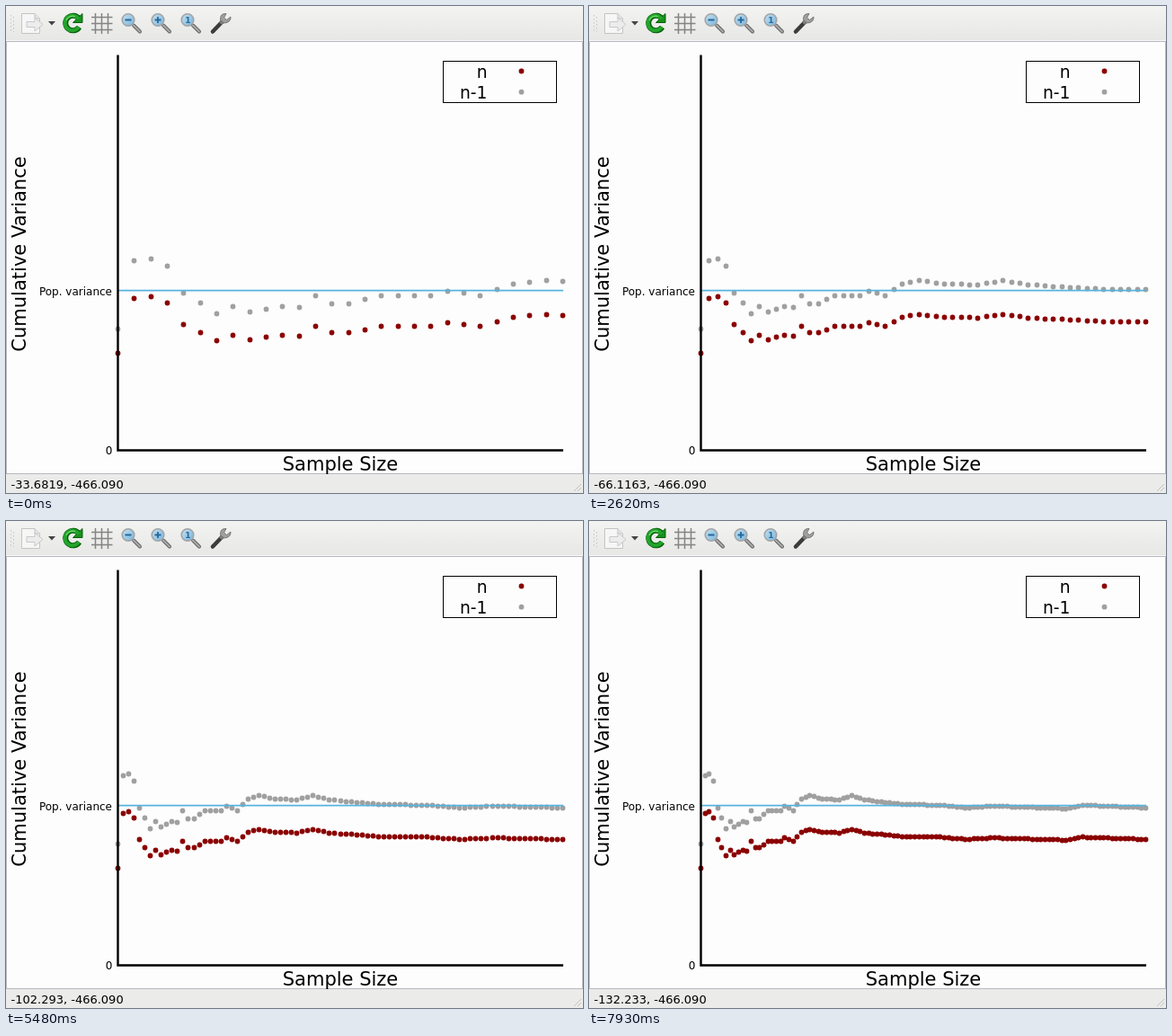
These frames come from a looping animation (642x542 px, 8 s). An HTML page:

```html
<!DOCTYPE html>
<html lang="en">
<head>
<meta charset="utf-8">
<title>Cumulative variance</title>
<style>
  html, body { margin: 0; width: 100%; height: 100%; overflow: hidden; background: #ececec; }
  svg { display: block; width: 100%; height: 100%; }
  text { font-family: "DejaVu Sans", sans-serif; fill: #000; white-space: pre; }
  .dots { fill: none; stroke-width: 5.8; stroke-linecap: round; }
  .n { stroke: #8b0000; }
  .n1 { stroke: #a0a0a0; }
</style>
</head>
<body>
<svg viewBox="0 0 642 542">
  <defs>
    <linearGradient id="bar" x2="0" y2="1">
      <stop offset="0" stop-color="#f3f3f2"/><stop offset="1" stop-color="#e7e7e6"/>
    </linearGradient>
    <linearGradient id="lens" x2="1" y2="1">
      <stop offset="0" stop-color="#c4e2f2"/><stop offset="1" stop-color="#78b4dc"/>
    </linearGradient>
    <g id="zoom">
      <path d="M6 6L13 13" stroke="#666" stroke-width="4" stroke-linecap="round"/>
      <path d="M6 6L13 13" stroke="#aaa" stroke-width="2" stroke-linecap="round"/>
      <circle r="6.8" fill="url(#lens)" stroke="#a4a4a4" stroke-width="1.6"/>
    </g>
  </defs>

  <!-- window -->
  <rect width="642" height="542" fill="#ebebea"/>
  <rect width="642" height="38" fill="url(#bar)"/>
  <path d="M0 38.5H642" stroke="#f8f8f8"/>
  <rect x=".5" y="39.5" width="641" height="481" fill="#fdfdfd" stroke="#b8b8c0"/>
  <path d="M640 532L632 540M640 536L636 540" stroke="#c0c0c0"/>

  <!-- toolbar -->
  <path d="M5.5 10V29M8.5 12V29" stroke="#c4c4c4" stroke-dasharray="1.5 2.5"/>
  <path d="M17.5 8.5H32L37.5 14V30.5H17.5Z" fill="#f6f6f6" stroke="#c4c4c4"/>
  <path d="M32 8.5V14H37.5" fill="#e4e4e4" stroke="#c4c4c4"/>
  <path d="M23 17.5H32V13L41 20.5L32 28V23.5H23Z" fill="#ececec" stroke="#c8c8c8"/>
  <path d="M47 17H55L51 21.5Z" fill="#444"/>
  <g fill="none" stroke-linejoin="round">
    <path d="M81.5 14.5A8.3 8.3 0 1 0 81.5 23.5" stroke="#086008" stroke-width="6"/>
    <path d="M85 8.5V18.5H74.5Z" fill="#18901c" stroke="#086008"/>
    <path d="M81 14.5A8.3 8.3 0 1 0 81 23.3" stroke="#22a42c" stroke-width="4"/>
    <path d="M67 16A8 8 0 0 1 77 11.5" stroke="#78d878" stroke-width="1.2"/>
  </g>
  <path d="M99.5 8V31M106.5 8V31M113.5 8V31M95 12.5H118.5M95 19.5H118.5M95 26.5H118.5" stroke="#848484" stroke-width="1.5"/>
  <use href="#zoom" x="136" y="15.5"/>
  <use href="#zoom" x="169" y="15.5"/>
  <use href="#zoom" x="202" y="15.5"/>
  <path d="M132.5 15.5H139.5M165.5 15.5H172.5M169 12V19" stroke="#286898" stroke-width="1.8"/>
  <text x="199.2" y="19" font-size="9" font-weight="bold" style="fill:#286898">1</text>
  <path d="M230 28.5L241 17" stroke="#3c3c3c" stroke-width="4.5" stroke-linecap="round"/>
  <path d="M238.5 19.5L243 15" stroke="#808080" stroke-width="3.5"/>
  <path d="M245 8.5Q238 8 238.5 15.5L242.5 19Q250.5 18.5 250 12L245.5 15.5L242.5 13Z" fill="#a0a0a0" stroke="#666" stroke-width=".8"/>

  <!-- plot -->
  <text x="118" y="322" font-size="12" text-anchor="end">Pop. variance</text>
  <text x="118.5" y="499" font-size="12" text-anchor="end">0</text>
  <text x="372" y="517" font-size="21" text-anchor="middle">Sample Size</text>
  <text transform="translate(22 276) rotate(-90)" font-size="21" text-anchor="middle">Cumulative Variance</text>
  <path d="M124 316.5H131M613 316.5H620" stroke="#606060"/>
  <path id="low" class="dots n"/>
  <path id="high" class="dots n1"/>
  <path d="M125 316.7H620" stroke="#56b4e0" stroke-width="1.8"/>
  <path d="M124.5 54.5V494.5H620" fill="none" stroke="#000" stroke-width="2.4"/>

  <!-- key -->
  <rect x="486.5" y="61.5" width="126" height="46" fill="none" stroke="#000"/>
  <text x="535.5" y="80" font-size="18.7" text-anchor="end">n</text>
  <text x="535.5" y="103" font-size="18.7" text-anchor="end">n-1</text>
  <path class="dots n" d="M573.5 72.5h0"/>
  <path class="dots n1" d="M573.5 95.7h0"/>

  <text id="status" x="5.5" y="537" font-size="13"></text>
</svg>
<script>
const LOOP = 8000, LEFT = 124, WIDTH = 495, BASE = 494;

// Turning points of the n-1 estimate: sample index, height on the stage.
const curve = [
  [0, 359], [1, 283], [2, 281], [3, 289], [4, 319], [6, 342], [7, 334], [8, 340],
  [10, 334], [11, 335], [12, 322], [13, 331], [14, 331], [16, 322], [19, 322], [20, 317],
  [22, 322], [24, 309], [26, 305], [29, 309], [33, 310], [36, 305], [39, 310], [48, 315],
  [57, 316], [63, 319], [70, 317], [87, 320], [91, 316], [106, 319]
];

// Time and index of the newest sample.
const progress = [[0, 27], [1310, 39], [4440, 72], [7930, 106]];

function lerp(points, x) {
  const next = points.findIndex(p => p[0] > x);
  if (next < 0) return points.at(-1)[1];
  const [x0, y0] = points[next - 1], [x1, y1] = points[next];
  return y0 + (y1 - y0) * (x - x0) / (x1 - x0);
}

// The plot redraws at a steady rate, which halves after two seconds.
function newestAt(time) {
  const step = time < 2020 ? 102 : 204, phase = 2600 % step;
  const redraw = phase + Math.floor((time - phase) / step) * step;
  return Math.round(lerp(progress, Math.max(0, redraw)));
}

const byId = id => document.getElementById(id);

function dots(last, scale) {
  return Array.from({ length: last + 1 }, (_, i) => {
    const x = Math.round(LEFT + WIDTH * i / last) + 0.5;
    const y = Math.floor(BASE - (BASE - lerp(curve, i)) * scale + 0.35) + 0.5;
    return `M${x} ${y}h0`;
  }).join("");
}

let shown = -1;
function draw(time) {
  const last = newestAt(time);
  if (last === shown) return;
  shown = last;
  byId("low").setAttribute("d", dots(last, 0.8));
  byId("high").setAttribute("d", dots(last, 1));
  byId("status").textContent = `-${(last * 1.2474768).toPrecision(6)}, -466.090`;
}

const start = performance.now();
function tick() {
  draw((performance.now() - start) % LOOP);
  requestAnimationFrame(tick);
}
tick();
</script>
</body>
</html>
```
